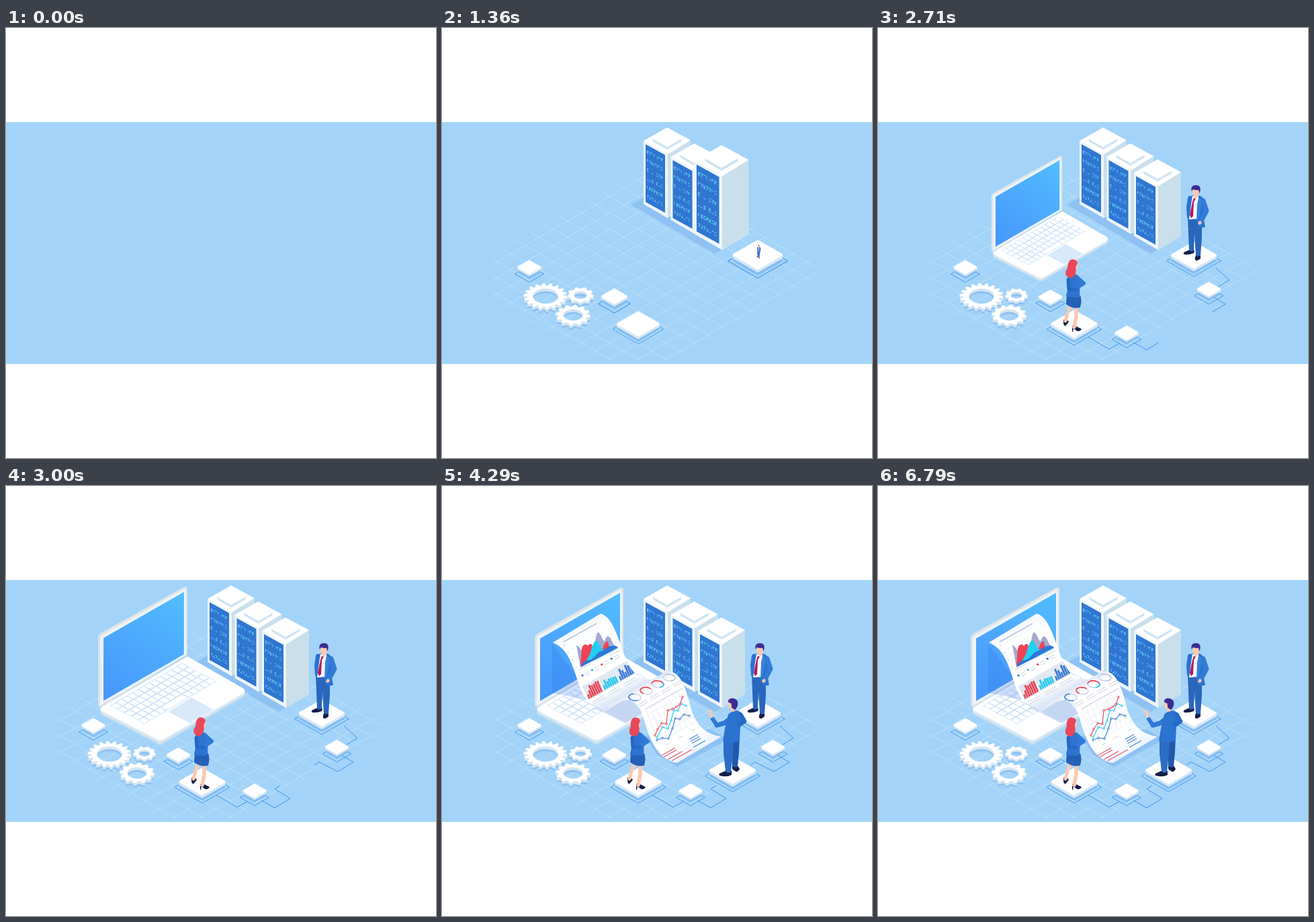
Write an HTML page with a canvas that moves like this. It is 640 by 640 pixels and loops after 6870 ms.

```html
<!DOCTYPE html>
<html lang="en">
<head>
<meta charset="utf-8">
<title>Isometric data report</title>
<style>
html, body { margin: 0; height: 100%; overflow: hidden; background: #fff; }
canvas { display: block; }
</style>
</head>
<body>
<canvas id="stage" width="640" height="640"></canvas>
<script>
const c = document.getElementById('stage').getContext('2d');
const LOOP = 6870, SHADOW = '#8fc1f2', BLUE = '#2c72cf', NAVY = '#141d4a', SKIN = '#fbc8b0', HAIR = '#3d2b94';
c.lineJoin = 'round';

// Helpers
const clamp = v => Math.min(1, Math.max(0, v));
const ease = p => .5 - .5 * Math.cos(Math.PI * clamp(p));
const fill = (color, d) => { c.fillStyle = color; c.fill(new Path2D(d)); };
const line = (color, w, d, cap = 'butt') => {
  c.strokeStyle = color; c.lineWidth = w; c.lineCap = cap; c.stroke(new Path2D(d));
};
const limb = (color, w, d) => line(color, w, d, 'round');
const oval = (color, x, y, rx, ry, a = 0) => {
  c.fillStyle = color; c.beginPath(); c.ellipse(x, y, rx, ry, a, 0, 7); c.fill();
};
const group = draw => { c.save(); draw(); c.restore(); };
const turn = (x, y, deg, draw) => group(() => {
  c.translate(x, y); c.rotate(deg * Math.PI / 180); c.translate(-x, -y); draw();
});
const diamond = (x, y, w, h = w * .575) => `M${x - w} ${y}L${x} ${y - h}L${x + w} ${y}L${x} ${y + h}Z`;
const random = seed => () => (seed = seed * 16807 % 2147483647) / 2147483647;

// Pop in: grow past full size, then settle
function scaleAt(t, start) {
  const d = t - start;
  if (d <= 0) return 0;
  return d < 300 ? 1.17 * ease(d / 300) : 1.17 - .17 * ease((d - 300) / 200);
}
function pop(t, start, x, y, draw) {
  const s = scaleAt(t, start);
  if (s > .001) group(() => { c.translate(x, y); c.scale(s, s); c.translate(-x, -y); draw(); });
}

function grid(alpha) {
  group(() => {
    c.beginPath(); c.rect(75, 218, 485, 276); c.clip();
    let d = '';
    const cross = (sum, diff) => `${(sum - diff) / 1.154} ${(sum + diff) / 2}`;
    for (let k = -10; k < 3; k++) { const s = 637 + 24.2 * k; d += `M${cross(s, 30)}L${cross(s, 363)}`; }
    for (let k = 0; k < 14; k++) { const f = 349 - 24.2 * k; d += `M${cross(378, f)}L${cross(692, f)}`; }
    c.globalAlpha = alpha;
    line('rgba(255,255,255,.26)', 1, d);
  });
}

const glyphs = (() => {
  const rnd = random(77);
  let d = '';
  for (let r = 0; r < 6; r++) for (let i = 0; i < 7; i++) {
    const x = 305 + i * 3.5, y = 182.5 + r * 13.2 + i * 1.9;
    if (rnd() < .6) d += `M${x} ${y}l2.5 1.4`;
    if (rnd() < .55) d += `M${x} ${y + 3.5}l2.5 1.4`;
    if (rnd() < .45) d += `M${x + .4} ${y}v3.5`;
    if (rnd() < .5) d += `M${x + 2.4} ${y + 1.2}l-1.8 3.2`;
  }
  return d;
})();

function server() {
  fill('#c9dfeb', 'M336 187L370 167V263L336 283Z');
  fill('#eef5fa', 'M300 168L336 187V283L300 262Z');
  fill('#fff', 'M300 168L335 148L370 167L336 188Z');
  fill('#cfe4f3', 'M314 165V169L335 181L356 169V165L335 177Z');
  fill('#fff', diamond(335, 165, 21, 12));
  fill('#3076d1', 'M303 173L332 189V275L303 259Z');
  line('#5ecbf2', 1, glyphs);
}

function tile(x, y, w) {
  const big = w > 20, side = big ? 4 : 3;
  const slab = (color, dy) => {
    const d = diamond(x, y + dy, w - 2, w * .575 - 1.3);
    fill(color, d); line(color, 3, d);
  };
  line('#4599ef', 1, diamond(x, y + (big ? 8.5 : 10), w + (big ? 6 : 3.5)));
  slab('#86bcf2', big ? 8 : 7);
  for (let i = side; i; i--) slab('#d7e8f4', i);
  slab('#fff', 0);
}

function gear(x, y, r, teeth, hole) {
  const depth = r > 20 ? 4 : 3;
  const ring = (color, dy) => {
    c.fillStyle = color; c.beginPath();
    for (let i = 0; i < teeth * 4; i++) {
      const a = (i + .5) / (teeth * 4) * Math.PI * 2, q = i % 4 < 2 ? r : r * .82;
      c.lineTo(x + q * Math.cos(a), y + dy + q * .59 * Math.sin(a));
    }
    c.closePath();
    c.moveTo(x + hole, y + dy);
    c.ellipse(x, y + dy, hole, hole * .59, 0, 0, Math.PI * 2);
    c.fill('evenodd');
  };
  ring(SHADOW, depth + 3);
  for (let i = depth; i; i--) ring('#d3e5f1', i);
  ring('#fff', 0);
}

function connector(points, p) {
  if (p <= 0) return;
  let length = 0;
  points.forEach((q, i) => { if (i) length += Math.hypot(q[0] - points[i - 1][0], q[1] - points[i - 1][1]); });
  group(() => {
    c.setLineDash([length * clamp(p), 999]);
    line('#3f95ed', 1, 'M' + points.join('L'));
  });
}

function laptop() {
  const base = 'M143 329L270 254L352 301Q358 305 352 309L236 376Q230 380 224 376L144 335Q139 332 143 329Z';
  group(() => { c.translate(0, 6); fill('#cbdfed', base); });
  group(() => { c.translate(0, 3); fill('#dceaf4', base); });
  fill('#fff', base);
  group(() => {
    c.transform(106, -63, 51, 27, 156, 327);
    c.fillStyle = '#cfe3f7'; c.fillRect(0, 0, 1, 1);
    c.fillStyle = '#fff';
    for (let j = 0; j < 5; j++) for (let i = 0; i < 13; i++) {
      if (j == 4 && i > 3 && i < 8) continue;
      c.fillRect(i / 13 + .007, j / 5 + .018, 1 / 13 - .014, .164);
    }
    c.fillRect(4 / 13 + .007, .818, 4 / 13 - .014, .164);
  });
  fill('#d9e9f9', 'M242 336L276 315L309 333L274 353Z');
  fill('#dbe4ea', 'M138 227Q138 222 143 219L264 152Q270 149 270 155V252L143 329Q138 330 138 325Z');
  fill('#edf3f7', 'M141 228Q141 224 145 222L264 155Q268 153 268 158V252L141 327Z');
  const g = c.createLinearGradient(264, 160, 147, 315);
  g.addColorStop(0, '#52bcff'); g.addColorStop(1, '#4797fb');
  fill(g, 'M146 227L265 159V251L146 320Z');
}

// Sheet of paper with its charts
const notes = (x, y, len, n, color = '#c3cbdc', w = .9) => {
  for (let i = 0; i < n; i++) line(color, w, `M${x + i * 2} ${y + i * 3}l${len} ${-len * .56}`);
};

function bars(x, y, color, seed) {
  const rnd = random(seed);
  group(() => {
    c.transform(25, -14, -9, -21, x, y);
    c.fillStyle = '#e1e8f0'; c.fillRect(0, 0, .92, 1);
    c.fillStyle = color;
    for (let i = 0; i < 7; i++) c.fillRect(.05 + i * .12, .06, .095, .3 + rnd() * .5);
  });
}

function series(color, points) {
  line(color, 1.1, 'M' + points.join('L'));
  for (const [x, y] of points) {
    oval(color, x, y, 1.7, 1.7);
    oval('#fff', x, y, .8, .8);
  }
}

function topCharts() {
  notes(181, 232, 49, 1, '#b5c0d8', 1.5);
  for (let i = 0; i < 5; i++) line('#e3e8f1', .6, `M${191 + i * 4} ${244 + i * 7}l57 -32`);
  for (let i = 0; i < 4; i++) oval('#b7bfd3', 182 + i * 6, 237 + i * 11, 1.2, .8);
  fill('#a5a8cf', 'M206 269L200 237C205 238 207 246 212 250L224 246C228 242 228 220 232 218C237 218 238 230 242 231C245 222 248 222 251 227C254 234 257 239 262 241Z');
  fill('#ee4354', 'M206 268L208 242C210 235 214 234 217 238C220 234 223 234 224 239L226 250L231 256Z');
  fill('#1fd0f2', 'M206 268C213 264 217 257 221 248C224 236 228 228 231 231C235 234 236 244 240 241C244 236 247 236 250 238L262 241L230 258Z');
  fill('#ee4354', 'M239 243C241 235 244 231 247 231C247 237 250 241 252 245Z');
  fill('#3275d8', 'M206 270C211 258 215 260 220 259C228 256 232 245 238 246C244 242 254 234 262 240Z');
  notes(203, 274, 18, 1);
  notes(247, 250, 15, 2);
  ['#3275d8', '#1fbfe8', '#ee4354', '#3275d8'].forEach((color, i) => {
    const x = 209 + i * 14.4, y = 282 - i * 8.3;
    oval(color, x, y, 1.7, 1.5);
    notes(x + 3, y - 2, 7, 2);
  });
  ['#e94355', '#23c9ec', '#3b78d4'].forEach((color, i) => {
    bars(218 + i * 23.5, 319 - i * 13.5, color, 41 + i * 93);
    notes(223 + i * 23.5, 322 - i * 13.5, 18, 2);
  });
}

function bottomCharts() {
  ['#397dde', '#ee4354', '#ee4354', '#b7c6dc'].forEach((color, i) => {
    const x = 287 + i * 17, y = 314.5 - i * 9.8;
    const ring = (color, from, to) => {
      c.strokeStyle = color; c.lineWidth = 1.6; c.beginPath();
      c.ellipse(x, y, 9, 5, .1, from, to); c.stroke();
    };
    ring('#cad7e9', 0, 7);
    ring(color, 1 + i, 4.5 + i);
    if (i == 2) ring('#20c5ec', -.6, 1.2);
    notes(x + 5, y + 11, 13, 2);
  });
  const at = (u, v) => `${322 + 55 * u - 19 * v} ${382 - 31 * u - 50 * v}`;
  let d = '';
  for (let i = 0; i <= 8; i++) d += `M${at(i / 8, 0)}L${at(i / 8, 1)}`;
  for (let i = 0; i <= 6; i++) d += `M${at(0, i / 6)}L${at(1, i / 6)}`;
  line('#e0e4ee', .6, d);
  line('#bcc5d8', .9, `M${at(0, 1)}L${at(1, 1)}`);
  series('#3b78d4', [[320, 378], [328, 375], [337, 376], [343, 361], [347, 346], [354, 347], [360, 340], [368, 342]]);
  series('#22c7ee', [[320, 374], [328, 359], [336, 361], [341, 349], [345, 334], [351, 334], [356, 324], [363, 327]]);
  series('#ea4356', [[317, 371], [321, 362], [327, 353], [334, 354], [336, 334], [343, 332], [349, 329], [354, 325], [358, 314]]);
  for (let i = 0; i < 3; i++) notes(333 + i * 19, 386 - i * 10.5, 6, 1);
  notes(327, 401, 20, 2, '#e55a6c', 1.2);
  notes(336, 407, 22, 1, '#e55a6c', 1.2);
  notes(342, 409, 30, 1, '#e55a6c', 1.2);
  notes(368, 377, 13, 3, '#4b86d8', 1.2);
  notes(374, 389, 18, 1, '#4b86d8', 1.2);
}

function sheet(t) {
  const p = clamp((t - 3090) / 860);
  if (!p) return;
  const edge = 327 + 310 * p;
  group(() => {
    c.beginPath();
    c.moveTo(100, 100); c.lineTo(500, 100); c.lineTo(500, edge - 285); c.lineTo(100, edge - 57);
    c.clip();
    fill('rgba(40,105,225,.22)', 'M164 235L202 285L214 318L164 308Z');
    fill('rgba(80,110,205,.15)', 'M222 331L280 318L300 338L272 353L242 338Z');
    fill(SHADOW, 'M302 372L320 400L350 418L426 377L400 362Z');
    const g = c.createLinearGradient(165, 233, 287, 447);
    [[0, '#f5f8fc'], [.08, '#fff'], [.42, '#fff'], [.49, '#dce6f5'], [.54, '#fff'], [.9, '#fff'], [1, '#edf3fa']]
      .forEach(stop => g.addColorStop(...stop));
    const paper = 'M165 233L236 190C256 194 264 236 275 260C284 280 296 290 312 288C322 284 328 277 339 276C358 278 364 308 372 335C380 358 394 370 416 373L350 412C328 410 314 388 305 362C298 338 294 322 280 318C268 316 252 332 238 330C210 328 206 300 197 275C190 255 182 240 165 233Z';
    fill(g, paper);
    c.clip(new Path2D(paper));
    topCharts();
    bottomCharts();
  });
}

// People
function standingMan(tilt) {
  fill(NAVY, 'M471 331L470 335Q463 338 456 337Q453 335 457 333L464 330Z');
  fill(NAVY, 'M473 337L480 337L480 343Q475 348 472 345Q471 342 473 339Z');
  fill('#2a66bc', 'M461 281L482 283L482 312L480 339Q476 341 473 338L471 306L470 331Q466 334 463 331Z');
  limb(BLUE, 6, 'M464 253L462 267L463 281');
  fill(BLUE, 'M463 251L470 249L480 250Q487 254 487 263L484 280L487 296Q480 299 475 295L473 285L462 284Z');
  fill('#f8fbff', 'M468 250L477 251L475 284L463 285L466 263Z');
  fill('#b5175c', 'M470 253L473 254L470 259L469 280L466 283L464 278L468 259Z');
  fill('#3a82da', 'M478 251L482 259L477 284L474 286L475 262Z');
  limb('#327bd6', 7, 'M484 257L489 272L481 287');
  oval(SKIN, 479, 290, 2.4, 2.8, .5);
  turn(473, 251, tilt, () => {
    fill(SKIN, 'M470 245H477V251L473 254L470 251Z');
    oval(SKIN, 473, 244.5, 5, 6.3);
    fill(HAIR, 'M467 243C465 237 468 233.5 474 234C480 234 481 240 478.5 246L477 241Q472 242 469 240Z');
  });
}

function woman(tilt) {
  fill(NAVY, 'M276 434L282 435L284 437L282 440L278 444L276 440Z');
  fill(NAVY, 'M289 443L295 444L303 448Q301 452 296 451L291 447L290 452H289Z');
  limb(SKIN, 5, 'M287 412L282 424L279 436');
  limb(SKIN, 5.6, 'M295 413L295 429L292 445');
  fill('#2460b6', 'M281 396L301 398Q304 404 301 416Q290 419 280 411Z');
  fill('#2e73d0', 'M281 374Q285 366 293 366Q301 368 301 376L300 401Q289 402 280 399L283 385Z');
  limb('#3079d8', 6, 'M297 372L306 380L295 387');
  limb('#2567c2', 5, 'M283 375L284 389L294 389');
  turn(291, 370, tilt, () => {
    oval(SKIN, 293, 355, 4, 6);
    fill('#e8485a', 'M283 349C285 343 293 343 296 348C297 352 293 353 294 358C295 364 293 371 288 372C282 373 277 368 280 361C283 357 281 353 283 349Z');
  });
}

// lift runs from 0 (arm held low) to 1 (hand raised)
function presenter(lift, wave) {
  fill(NAVY, 'M422 424L431 424L431 430Q424 434 413 431Q411 428 415 427Z');
  fill(NAVY, 'M432 415L440 416L443 421Q441 426 437 425L432 421Z');
  fill('#2159ab', 'M430 374L443 374L442 396L440 418Q436 420 432 417L431 397Z');
  fill('#2c6dc6', 'M419 374L434 376L433 398L430 426Q426 428 422 425L419 398Z');
  turn(430, 345, 30 * (lift - 1), () => {
    limb('#2f78d4', 7, 'M430 345L420 353L409 356');
    turn(409, 356, 22 * (lift - 1) + 12 * wave, () => {
      limb('#2f78d4', 6, 'M409 356L401 348');
      limb(SKIN, 4, 'M399 345L395 339');
      limb(SKIN, 1.7, 'M398 343L397 337M395 340L392 337');
    });
  });
  fill(BLUE, 'M426 340Q431 335 439 334Q448 336 448 344L444 358L443 379Q430 384 418 379L421 361Z');
  limb('#256ac6', 6.5, 'M445 341L450 350L443 355');
  turn(433, 335, 3 * wave, () => {
    fill(SKIN, 'M428 327H436V335L431 336Z');
    oval(SKIN, 430, 325.5, 4.3, 6);
    fill(HAIR, 'M425 322C425 316 431 315 436 317C442 320 440 329 436 333L431 330L430 324Z');
  });
}

function draw(t) {
  c.clearRect(0, 0, 640, 640);
  group(() => {
    c.beginPath(); c.rect(0, 140, 640, 360); c.clip();
    c.fillStyle = '#a3d3f8'; c.fillRect(0, 140, 640, 360);
    grid(ease((t - 100) / 500));

    [430, 560, 638].forEach((start, i) => {
      const x = 325 + i * 40.5, y = 263 + i * 24;
      pop(t, start, x, y, () => fill(SHADOW, diamond(x, y, 44, 25)));
    });
    [470, 638, 1080].forEach((start, i) => group(() => {
      c.translate(i * 40.5, i * 23.8);
      pop(t, start, 335, 283, server);
    }));

    pop(t, 2525, 291, 348, laptop);

    const early = (t - 1850) / 350, late = (t - 2450) / 520;
    connector([[313, 460], [344, 478], [360, 469]], early);
    connector([[503, 357], [523, 375], [502, 388]], early);
    connector([[380, 468], [400, 479], [423, 465], [400, 451], [408, 446]], late);
    connector([[500, 401], [517, 411], [494, 425], [466, 411], [459, 415]], late);

    const place = (start, x, y, w) => pop(t, start, x, y + 6, () => tile(x, y, w));
    place(520, 130, 356, 18);
    pop(t, 664, 154, 402, () => gear(154, 399, 32.5, 18, 19));
    pop(t, 1070, 206, 399, () => gear(206, 397.5, 17, 9, 8.5));
    pop(t, 510, 195, 430, () => gear(195, 427, 26, 12, 14.5));
    place(1105, 256.5, 400, 18);
    place(1110, 470, 338, 34.5);
    place(2000, 492.5, 388.5, 18);
    place(2000, 370, 453.5, 18);

    const nod = 2.5 * Math.sin(clamp((t - 5860) / 930) * Math.PI * 2);
    const wave = .5 - .5 * Math.cos(clamp((t - 3290) / 3210) * 3 * Math.PI);
    pop(t, 1285, 471, 342, () => standingMan(nod));
    sheet(t);
    place(1152, 292, 440, 35);
    pop(t, 1500, 290, 447, () => woman(2 - 6 * wave));
    place(3100, 432.5, 423, 35);
    pop(t, 3165, 425, 431, () => presenter(ease((t - 3500) / 500), wave));
  });
}

function tick() {
  draw(performance.now() % LOOP);
  requestAnimationFrame(tick);
}
tick();
</script>
</body>
</html>
```
